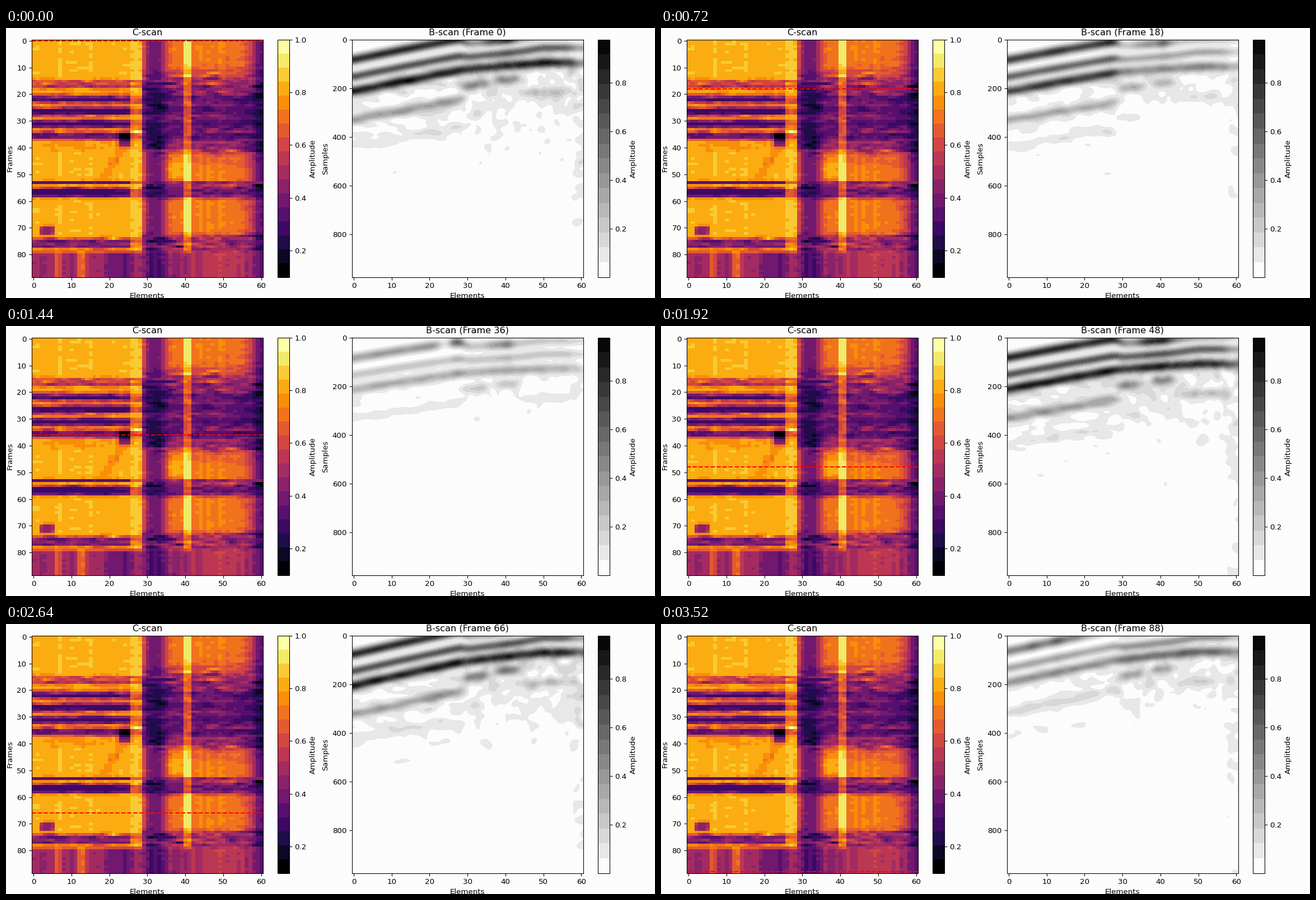
Write a matplotlib script that moves like this. It is 1159 by 483 pixels and loops after 3.56 s.

```python
import numpy as np
import matplotlib.pyplot as plt
from matplotlib.animation import FuncAnimation
from matplotlib.cm import ScalarMappable
from matplotlib.colors import ListedColormap, Normalize
from matplotlib.ticker import MultipleLocator

W, H, DPI = 1159, 483, 100
SCALE = W / 1200  # text and strokes are those of a 1200 px wide figure
FRAMES, COLS, DEPTH = 89, 61, 977
BG = "#fcfcfc"
rng = np.random.default_rng(7)
x = np.arange(COLS)
rows = np.arange(FRAMES)
depth = np.linspace(0, DEPTH, 246)[:, None]

for key in ("font.size", "axes.linewidth", "axes.labelpad", "axes.titlepad",
            *(f"{a}tick.major.{p}" for a in "xy"
              for p in ("size", "width", "pad"))):
    plt.rcParams[key] *= SCALE


def bump(v, center, half, power=8):
    """Flat-topped window around a center."""
    return 1 / (1 + np.abs((v - center) / half) ** power)


def step(v, center, width=.6):
    return 1 / (1 + np.exp(-(v - center) / width))


def blur(a, sigma, axis):
    reach = int(3 * sigma) + 1
    w = np.exp(-.5 * (np.arange(-reach, reach + 1) / sigma) ** 2)
    pad = [(0, 0), (0, 0)]
    pad[axis] = (reach, reach)
    out = np.apply_along_axis(np.convolve, axis,
                              np.pad(a, pad, mode="reflect"), w, "valid")
    return out / out.std()


def c_scan():
    """Row strengths move each column between a low and a high level."""
    ripple = np.cos(2 * np.pi * (rows - 24) / 4.7)
    left = (.96 - .35 * bump(rows, 16, 1.6)
            - bump(rows, 28.5, 8.7) * (.62 - .42 * ripple)
            - .85 * bump(rows, 53, .7) - .9 * bump(rows, 56.7, 1.7)
            - .68 * bump(rows, 75.9, 1.9))
    right = (.95 - .25 * bump(rows, 15, 4, 4)
             - bump(rows, 29.3, 11.9) * (.72 - .1 * ripple)
             - .45 * bump(rows, 53.5, 1) - .72 * bump(rows, 56.7, 2)
             - .5 * bump(rows, 76, 3.5))
    notch, ridge, bright = bump(x, 32, 2.6, 4), bump(x, 27, 1.4), bump(x, 40.5, .8)
    rim = bump(x, 62, 4.5, 4)
    high = (.84 - .11 * (x > 28) + .06 * ridge - .38 * notch + .21 * bright
            - .45 * rim + rng.normal(0, .016, COLS))
    low = .19 - .06 * notch + .42 * ridge + .3 * bright - .1 * rim
    tail = (.43 + .18 * bump(x, 12.5, 1.3) + .14 * bump(x, 6.5, 1)
            + .08 * bump(x, 50, 6) - .12 * bump(x, 22.5, 3.5)
            - .21 * bump(x, 32, 2.6, 4) - .15 * rim + rng.normal(0, .03, COLS))

    s = np.clip(np.where(x < 29, left[:, None], right[:, None]), .03, 1)
    t = low + (high - low) * s
    r = rows[:, None]
    streak = bump(x, 24 - (r - 39) * .46, 1.1)
    t -= .08 * streak * bump(r, 46.5, 5.5)
    t -= .45 * bump(x, 24, 1.6) * bump(r, 37, 2.5)
    t -= .42 * bump(x, 3.5, 1.8) * bump(r, 71, 1.6)
    t += .1 * bump(x, 37.5, 2) * bump(r, 46.5, 5)
    rough = (4 * s * (1 - s)) ** 2
    t += blur(rng.normal(size=t.shape), 1, 1) * (.008 + .07 * rough)

    ending = step(r, 79, .3)
    t = t * (1 - ending) + (tail + rng.normal(0, .006, t.shape)) * ending
    return .1 + .9 * np.clip(t, 0, 1)


scan = c_scan()

# B-scan: echo bands following one drifting path
path = np.interp(x, [0, 12, 28, 38, 50, 60], [210, 172, 124, 108, 92, 93])
side = step(x, 29)
edge = 1 - .45 * step(x, 57.5)
first = -130 + 23 * side - 9 * step(x, 46, 2)
second = -60 + 9 * side - 10 * step(x, 46, 2)
drift_keys = [0, 36, 48, 66, 78, 88]
drift_left = [0, 2, 0, -6, 14, -18]
drift_right = [0, 34, 14, -25, -14, -28]

spots = [  # column, half width, offset below path, strength
    (32, 3.2, 67, .5), (40.5, 2.8, 58, .52), (50, 6, 122, .22),
    (32.5, 1.6, 190, .14), (37, 1.6, 110, .14)]

HOLD = 6
fields = []
for _ in range(FRAMES // HOLD + 2):
    raw = rng.normal(size=(len(depth), COLS))
    wide = blur(blur(raw, 2, 0), 1.1, 1)
    tall = blur(blur(raw, 2.8, 0), .55, 1)
    fields.append(wide * (1 - side) + tall * side)


def noise(i):
    k, f = divmod(i / HOLD, 1)
    a, b = fields[int(k)], fields[int(k) + 1]
    return (a * (1 - f) + b * f) / np.hypot(1 - f, f)


def echo(center, sigma=14.5):
    return np.exp(-.5 * ((depth - center) / sigma) ** 2)


def b_scan(i):
    move = [np.interp(i, drift_keys, d) for d in (drift_left, drift_right)]
    p = path + np.interp(x, [0, 50], move)
    row = np.convolve(np.pad(scan[i], 1, mode="edge"), [.25, .5, .25], "valid")
    level = scan[i, :24].mean() * (1 - side) + 1.1 * scan[i, 43:56].mean() * side
    main = (.72 * level + .28 * np.maximum(row, level * .8)) ** 1.3 * edge

    img = row * (1 - .4 * step(x, 43)) * echo(p + first)
    img += .85 * main * echo(p + second, 13)
    img += 1.03 * main * echo(p)
    faint = level ** 1.8 * (1 - side)
    img += .46 * faint * echo(p + 119 + .1 * x)
    img += .1 * faint * echo(p + 225 + .5 * x)
    for c, half, offset, gain in spots:
        img += gain * level * bump(x, c, half, 6) * echo(p + offset)

    n = noise(i)
    haze = .15 * np.exp(-depth / 380) * (1 + .55 * n)
    haze += .045 * bump(x, 59, 1.6, 4) * (1 + .6 * n)
    img += level * haze * step(depth, p - 25, 15)
    return np.clip(img, 0, DEPTH / 1000)


fig = plt.figure(figsize=(W / DPI, H / DPI), dpi=DPI, facecolor=BG)


def panel(left, data, extent, title, ylabel, **style):
    """Image with a colour bar at its right; returns axes, image and title."""
    def box(x0, width, top=20.6, bottom=445.6):
        return fig.add_axes([x0 / W, 1 - bottom / H, width / W,
                             (bottom - top) / H])
    ax, cax = box(left, 413.2), box(left + 439, 21.2)
    im = ax.imshow(data, aspect="auto", extent=extent, **style)
    ax.set(xlabel="Elements", ylabel=ylabel)
    fig.colorbar(ScalarMappable(im.norm, im.cmap), cax=cax, label="Amplitude",
                 ticks=MultipleLocator(.2))
    return ax, im, ax.set_title(title)


grays = np.linspace(248, 8, 16) / 255
grays[0] = 252 / 255
gray_map = ListedColormap(np.repeat(grays[:, None], 3, axis=1))

ax_c, _, _ = panel(45.8, scan, (-.5, 60.5, 88.5, -.5), "C-scan", "Frames",
                   cmap=plt.get_cmap("inferno", 17), norm=Normalize(.0995, 1),
                   interpolation="nearest")
marker = ax_c.axhline(0, color="red", linestyle="--", linewidth=1.5 * SCALE)
_, image, title = panel(617.6, b_scan(0), (-.5, 60.5, DEPTH, 0),
                        "B-scan (Frame 0)", "Samples", cmap=gray_map,
                        norm=Normalize(.0015, .977), interpolation="bicubic")


def update(i):
    marker.set_ydata([i, i])
    image.set_data(b_scan(i))
    title.set_text(f"B-scan (Frame {i})")
    return marker, image, title


anim = FuncAnimation(fig, update, frames=FRAMES, interval=40, repeat=True,
                     repeat_delay=0, blit=False)
plt.show()
```
